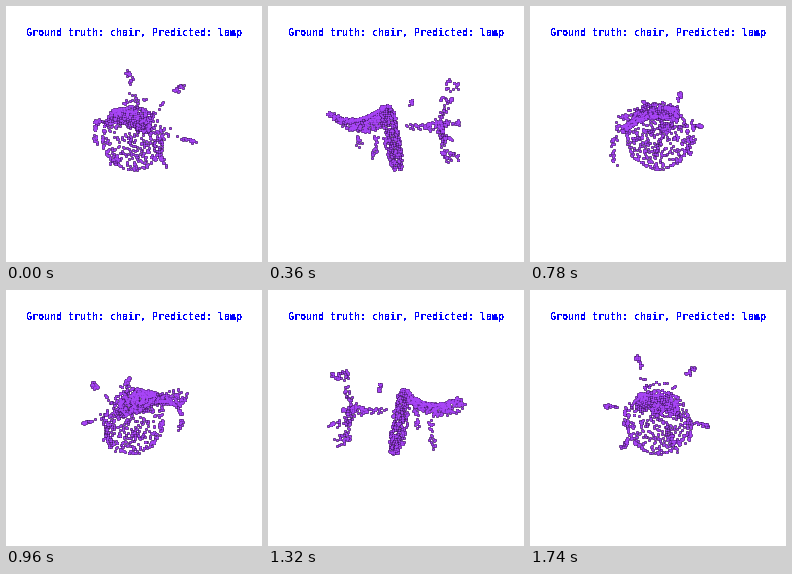
These frames come from a looping animation (256 by 256 pixels, 1800 ms). A matplotlib script:

```python
import matplotlib.pyplot as plt
import numpy as np
from matplotlib.animation import FuncAnimation

SIZE, DPI = 256, 100
FRAMES, STEP_MS = 30, 60
CAMERA = 247           # camera distance, in pixels at the centre
ROLL = 0.2             # sideways lean of the chair
EDGE_GAP = 9           # depth step that shows a dark edge
DOT, EDGE = 2.3, 3.0   # diameters in pixels
PURPLE, BLACK = (0.66, 0.27, 0.97, 1), (0.05, 0.0, 0.08, 1)

plt.rcParams["text.antialiased"] = False
rng = np.random.default_rng(7)


def cloud(side, up, axis, jitter=0.0):
    pts = np.stack(np.broadcast_arrays(side, up, axis), axis=1).astype(float)
    return pts + rng.normal(0, 1, pts.shape) * jitter


def seat(rim=130, face=270):
    a = rng.uniform(0, 2 * np.pi, rim + face)
    r = np.r_[np.full(rim, 1.0), np.sqrt(rng.uniform(0, 1, face))]
    side, up = 31 * r * np.cos(a), -3.5 + 31.5 * r * np.sin(a)
    thick = np.r_[rng.uniform(-4, 4, rim), rng.choice([-4, 4], face)]
    return cloud(side, up, -4 - 0.17 * up + thick, 0.5)


def back(n=620):
    axis = -67 + 58 * rng.uniform(0, 1, n) ** 0.8
    half = 25 - 7 * ((axis + 34) / 30) ** 2
    side = half * rng.uniform(-1, 1, n)
    up = 13 + 12 * ((axis + 42) / 32) ** 2 - ROLL * side - 0.012 * side ** 2
    return cloud(side, up, axis, 0.7)


def arm(sign, n=26):
    t = rng.uniform(0, 1, n)
    up = 6 - 24 * t - sign * 37 * ROLL
    return cloud(sign * (37 - 3 * (2 * t - 1) ** 2), up, -26 - 3 * t, 1.3)


def lever(n=14):
    t = rng.uniform(-1, 1, n)
    return cloud(2 + 15 * t, 33 - 5 * t ** 2, 16, 0.8)


def leg(end, hub=(-0.5, 8, 43), n=12, wheel=19):
    hub, tip = np.array(hub), np.array([*end, 52])
    t = rng.uniform(0.1, 0.7, (n, 1))
    bar = hub + (tip - hub) * t + rng.normal(0, 1.7, (n, 3))
    a = rng.uniform(0, 2 * np.pi, wheel)
    out = (tip - hub)[:2] / np.hypot(*(tip - hub)[:2])
    ring = cloud(tip[0] + 4 * np.cos(a) * out[0],
                 tip[1] + 4 * np.cos(a) * out[1],
                 tip[2] + 5.5 * np.sin(a), 1.1)
    return np.vstack([bar, ring])


def column(n=75):
    a = rng.uniform(0, 2 * np.pi, n)
    axis = 8 + 39 * rng.uniform(0, 1, n) ** 0.6
    r = np.where(axis > 33, 4.5, 2.2)
    return cloud(-0.5 + r * np.cos(a), 7 + r * np.sin(a), axis, 0.6)


FEET = [(-15, 44), (26, 37), (35, -5), (13, -21), (-26, -21), (-36, 9)]
chair = np.vstack([seat(), back(), arm(-1), arm(1), lever(), column()]
                  + [leg(foot) for foot in FEET])

fig = plt.figure(figsize=(SIZE / DPI, SIZE / DPI), dpi=DPI, facecolor="white")
ax = fig.add_axes([0, 0, 1, 1])
ax.set(xlim=(0, SIZE), ylim=(SIZE, 0))
ax.axis("off")
ax.text(20, 29.5, "Ground truth: chair, Predicted: lamp", color="#0000ff",
        family="DejaVu Sans Mono", weight="bold", size=10 * 72 / DPI,
        va="baseline")
dots = ax.scatter([], [], marker="o", linewidths=0)


def draw(i):
    phi = np.radians(360 / FRAMES * (i + 1))
    side, up, axis = chair.T
    x = side * np.cos(phi) + axis * np.sin(phi)
    near = axis * np.cos(phi) - side * np.sin(phi)
    scale = CAMERA / (CAMERA - near)
    xy = np.floor(np.c_[128 + x * scale, 128 - up * scale]) + 0.5

    # Each dark edge sits a little behind its own dot.
    order = np.argsort(np.r_[near - EDGE_GAP, near], kind="stable")
    is_dot = order >= len(chair)
    dots.set_offsets(np.vstack([xy, xy])[order])
    dots.set_sizes((np.where(is_dot, DOT, EDGE) * 72 / DPI) ** 2)
    dots.set_facecolors(np.where(is_dot[:, None], PURPLE, BLACK))
    return dots,


anim = FuncAnimation(fig, draw, frames=FRAMES, interval=STEP_MS,
                     repeat=True, repeat_delay=0)
plt.show()
```
